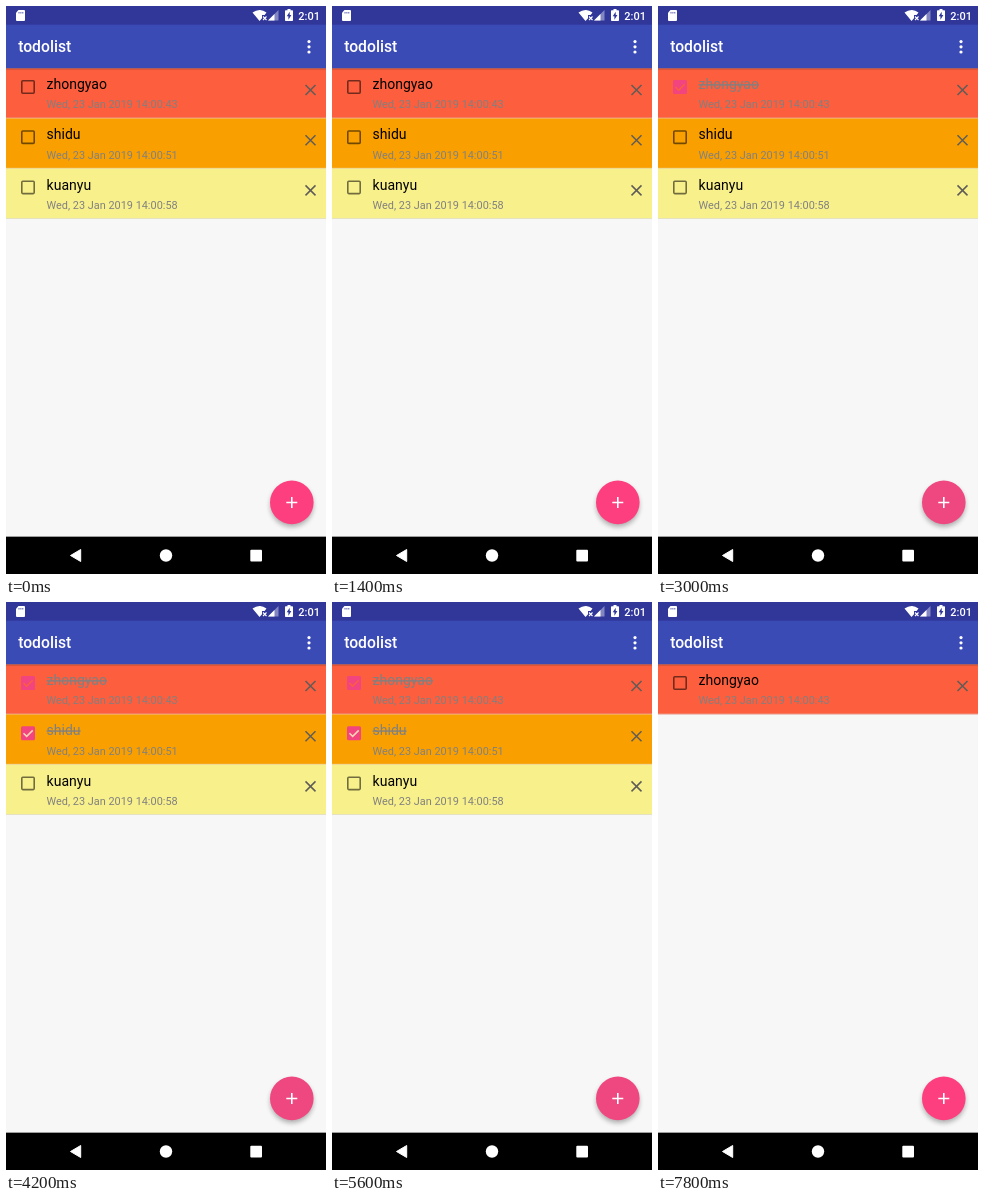
An HTML page for the animation above (8000 ms loop, 320 by 568 pixels).

```html
<!DOCTYPE html>
<html lang="en">
<head>
<meta charset="utf-8">
<title>todolist</title>
<style>
html, body { margin: 0; width: 100%; height: 100%; overflow: hidden; background: #f7f7f7; }
svg { display: block; width: 100%; height: 100%; font-family: Roboto, sans-serif; }
.name { font-size: 14px; }
.date { font-size: 10.9px; fill: #808080; }
.done .name { fill: #808080; text-decoration: line-through; }
.box { fill: none; stroke: #000; stroke-opacity: .55; stroke-width: 1.6; }
.close { fill: none; stroke: #5f5c58; stroke-width: 1.5; }
.on { display: none; }
.done .on { display: inline; }
.done .off { display: none; }
</style>
</head>
<body>
<svg viewBox="0 0 320 568">
  <defs>
    <linearGradient id="shade" x2="0" y2="1">
      <stop stop-color="#000" stop-opacity=".25"/>
      <stop offset="1" stop-color="#000" stop-opacity="0"/>
    </linearGradient>
    <filter id="blur" x="-30%" y="-30%" width="160%" height="160%">
      <feGaussianBlur stdDeviation="2.8"/>
    </filter>
  </defs>
  <rect width="320" height="568" fill="#f7f7f7"/>
  <g id="list"></g>

  <rect width="320" height="20" fill="#303799"/>
  <rect y="18.700" width="320" height="43.500" fill="#3b4bb6"/>
  <rect y="62.200" width="320" height="2.400" fill="url(#shade)"/>
  <g fill="#fff">
    <path d="M12.500 4H18q1 0 1 1v9q0 1-1 1h-7q-1 0-1-1V6.700z"/>
    <path d="M13 6v1.500M14.900 6v1.500M16.800 6v1.500" stroke="#303799" stroke-width=".8"/>
    <path d="M246.500 6.500Q253.500 1.500 260.500 6.500L258.600 9H256v3.200L253.500 15z"/>
    <path d="M257 10.500l3.500 3.500m0-3.500l-3.500 3.500" stroke="#fff" stroke-width="1.100"/>
    <path d="M272.500 4v10.500H262z" opacity=".4"/>
    <path d="M268.500 8v6.500H262z"/>
    <path d="M281.500 3h3v1.200h1.700q.8 0 .8.800v9.200q0 .8-.8.800h-6.400q-.8 0-.8-.8V5q0-.8.8-.8h1.700z"/>
    <path d="M283.700 5.700v3.200h1.700l-3 4.800v-3.400h-1.700z" fill="#303799"/>
    <text x="292.300" y="13.600" font-size="11" font-weight="500">2:01</text>
    <text x="12.200" y="46.300" font-size="15.700" font-weight="500">todolist</text>
    <circle cx="303" cy="35.600" r="1.600"/>
    <circle cx="303" cy="40.800" r="1.600"/>
    <circle cx="303" cy="46" r="1.600"/>
  </g>

  <circle cx="285.800" cy="499.500" r="21.500" opacity=".3" filter="url(#blur)"/>
  <circle id="fab" cx="285.800" cy="496.400" r="21.800"/>
  <path d="M280.300 496.500h11M285.800 491v11" stroke="#fff" stroke-width="1.600"/>

  <rect y="530.640" width="320" height="38"/>
  <g fill="#fff">
    <path d="M64.500 549.500L74.700 543.500V555.500z" stroke="#fff" stroke-linejoin="round"/>
    <circle cx="160" cy="549.500" r="6.200"/>
    <rect x="244.300" y="543.700" width="11.700" height="11.700" rx="1"/>
  </g>
</svg>
<script>
const LOOP = 8000, ROW = 50.2, TOP = 62.2;
const items = [
  { name: 'zhongyao', time: '14:00:43', color: '#fc5e3e', tick: '#fc5e3e', check: 2200, uncheck: 7800, remove: Infinity },
  { name: 'shidu', time: '14:00:51', color: '#f9a000', tick: '#fad6b4', check: 3800, uncheck: Infinity, remove: 6200 },
  { name: 'kuanyu', time: '14:00:58', color: '#f8f08b', tick: '#f8f08b', check: Infinity, uncheck: Infinity, remove: 7400 }
];
const list = document.getElementById('list');
const fab = document.getElementById('fab');

list.innerHTML = items.map(({ name, time, color, tick }) => `<g>
  <rect width="320" height="${ROW}" fill="${color}"/>
  <path d="M0 49.900h320" stroke="#d8d8d8" stroke-width=".6"/>
  <rect class="box off" x="15.800" y="12.600" width="12.400" height="12.400" rx="1"/>
  <g class="on">
    <rect x="15" y="11.800" width="14" height="14" rx="1.500" fill="#f2447f"/>
    <path d="M17.500 18.800l3.200 3.200 6-6" fill="none" stroke="${tick}" stroke-width="1.500"/>
  </g>
  <text class="name" x="40.600" y="21">${name}</text>
  <text class="date" x="40.600" y="40.200">Wed, 23 Jan 2019 ${time}</text>
  <path class="close" d="M299.500 16.800l10 10m0-10l-10 10"/>
</g>`).join('');
const rows = [...list.children];

function draw(t) {
  let y = TOP;
  items.forEach((item, i) => {
    const shown = t < item.remove;
    rows[i].style.display = shown ? '' : 'none';
    rows[i].setAttribute('transform', `translate(0 ${y})`);
    rows[i].classList.toggle('done', t >= item.check && t < item.uncheck);
    if (shown) y += ROW;
  });
  fab.setAttribute('fill', t >= 2200 && t < 6200 ? '#ef4880' : '#fd3f80');
}

function tick() {
  draw(performance.now() % LOOP);
  requestAnimationFrame(tick);
}
tick();
</script>
</body>
</html>
```
